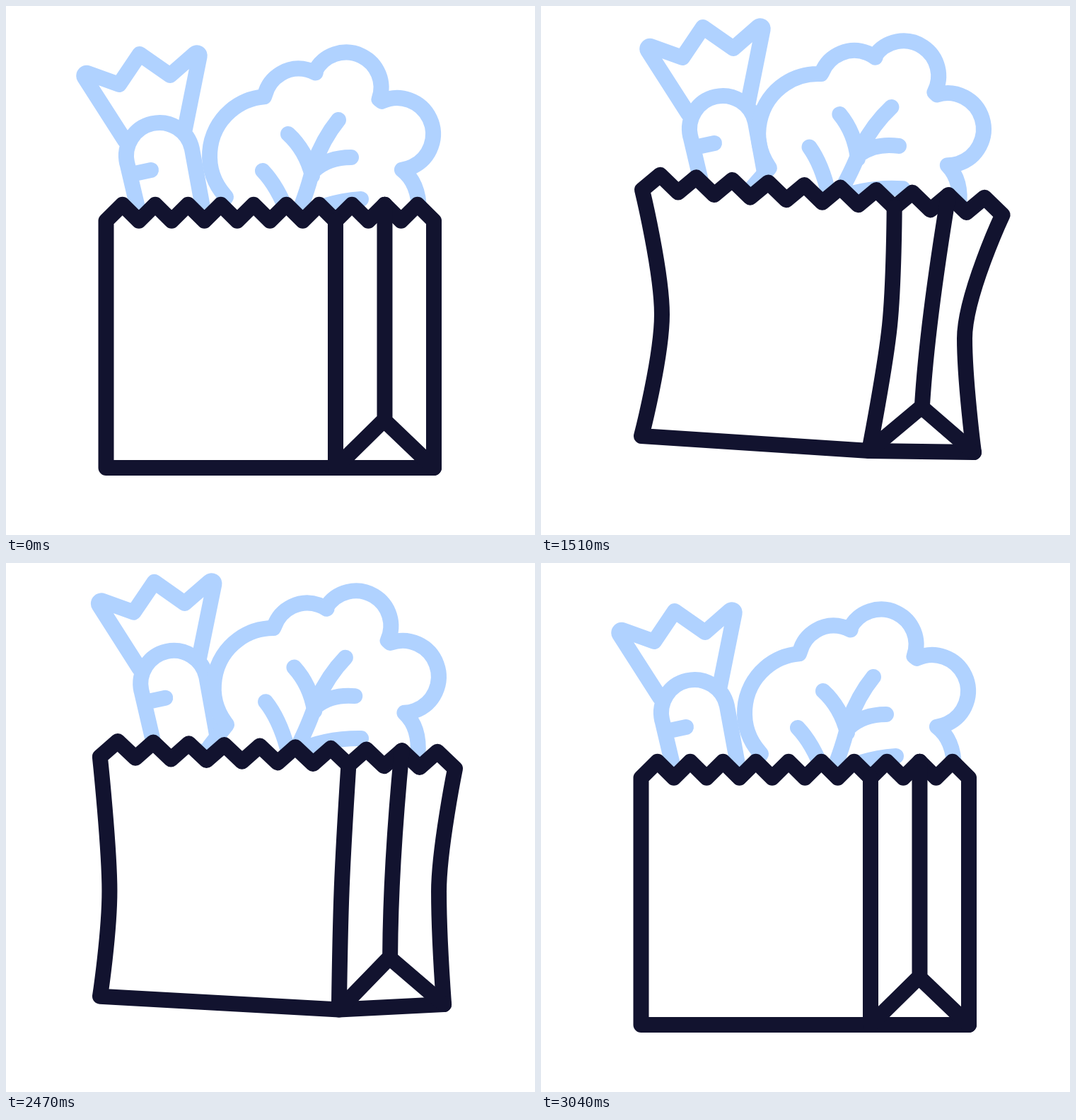
Write an HTML page with a canvas that moves like this. It is 748 by 748 pixels and loops after 3.07 s.

```html
<!DOCTYPE html>
<html lang="en">
<head>
<meta charset="utf-8">
<title>Grocery bag</title>
<style>
  html, body { margin: 0; width: 100%; height: 100%; overflow: hidden; background: #fff; }
  canvas { display: block; width: 100vw; height: 100vh; }
</style>
</head>
<body>
<canvas id="stage" width="748" height="748"></canvas>
<script>
const ctx = document.getElementById('stage').getContext('2d');
const DARK = '#12132f', LIGHT = '#b0d2ff';
const LOOP = 3070, STEP = 30, PHASE = 10;

// Bag points: top left/right, bottom left/middle/right,
// middles of left side, right side and fold, crease control, apex.
const BAG = {
  rest: [141.5, 303.8, 605, 303.8, 141.5, 653, 466, 653, 605, 653,
    141.5, 478, 605, 478, 466, 478, 535.5, 440, 534.5, 585.5],
  start: [137.5, 304, 609, 304, 142, 652.5, 466, 652, 606, 651,
    144, 485, 602, 468, 467.5, 470, 536, 440, 534.5, 585.5],
  rise: [134.5, 275, 645.5, 298.5, 142, 623.5, 463, 636, 612, 635.5,
    167, 455, 596, 476, 488, 455, 548, 450, 537.5, 572],
  lean: [143, 260, 652.5, 295.5, 142, 608, 464, 629, 612, 631,
    171, 436, 599, 470, 493, 452, 546, 450, 538, 567],
  high: [136, 248.5, 646, 276, 137, 593, 470, 621, 618, 611.5,
    174, 425, 594, 447, 495, 432, 543, 430, 541, 545],
  squash: [136, 313, 611, 313, 135, 653, 468, 653, 611.5, 653,
    120.5, 505, 624, 490, 453, 495, 540.5, 440, 538.5, 587]
};

// Carrot x, y, angle, then broccoli x, y, angle.
const FOOD = {
  rest: [0, 0, 0, 0, 0, 0],
  start: [0.5, -0.3, 0, -1, 0, 0],
  rise: [27.5, -25.6, -0.024, 13.5, -13, 0.12],
  lean: [40, -38, 0, 23, -21, 0.138],
  high: [30.5, -50, -0.018, 15, -38, 0.122],
  squash: [7.5, -26.5, 0.058, -1, -9, 0.036]
};

const mix = (a, b, k) => a.map((v, i) => v + (b[i] - v) * k);
const smooth = u => u * u * (3 - 2 * u);
const hop = u => smooth(u * u);

// A pose is a blend (or overshoot) from one named pose to another.
const pose = (a, b = a, bagK = 1, foodK = bagK) => ({
  bag: mix(BAG[a], BAG[b], bagK),
  food: mix(FOOD[a], FOOD[b], foodK)
});

const PEAK = 1 / hop((2260 - 1510) / (2380 - 1510));

// Each key: time, pose, easing used to arrive there.
const KEYS = [
  [700, pose('rest')],
  [730, pose('start'), u => u],
  [1030, pose('rise'), u => u * (1.32 - 0.32 * u)],
  [1510, pose('lean'), u => 1 - Math.pow(1 - u, 2.3)],
  [2380, pose('lean', 'high', PEAK), hop],
  [2530, pose('rest', 'squash', 2.15, 0.8), u => u * u],
  [2650, pose('squash'), u => u * (0.7 + 0.3 * u)],
  [2830, pose('rest', 'squash', -0.12, 0.28), u => u * (1.6 - 0.6 * u)],
  [3040, pose('rest'), smooth]
];

function poseAt(t) {
  if (t <= KEYS[0][0]) return KEYS[0][1];
  const i = KEYS.findIndex(k => k[0] >= t);
  if (i < 0) return KEYS[0][1];
  const [t0, a] = KEYS[i - 1], [t1, b, ease] = KEYS[i];
  const k = ease((t - t0) / (t1 - t0));
  return { bag: mix(a.bag, b.bag, k), food: mix(a.food, b.food, k) };
}

function place(px, py, x, y, angle, draw) {
  ctx.save();
  ctx.translate(px + x, py + y);
  ctx.rotate(angle);
  ctx.translate(-px, -py);
  ctx.beginPath();
  draw();
  ctx.stroke();
  ctx.restore();
}

function line(x0, y0, x1, y1) {
  ctx.moveTo(x0, y0);
  ctx.lineTo(x1, y1);
}

function vein(x0, y0, cx, cy, x1, y1) {
  ctx.moveTo(x0, y0);
  ctx.quadraticCurveTo(cx, cy, x1, y1);
}

function lobe(cx, cy, r, x0, y0, x1, y1) {
  ctx.arc(cx, cy, r, Math.atan2(y0 - cy, x0 - cx), Math.atan2(y1 - cy, x1 - cx));
}

function carrot() {
  // leaves
  ctx.moveTo(168, 190);
  ctx.arcTo(104.5, 91, 160, 111, 4);
  ctx.lineTo(160, 111);
  ctx.lineTo(189, 68);
  ctx.lineTo(232, 98);
  ctx.arcTo(276, 59.4, 253, 174, 4);
  ctx.lineTo(253, 174);
  // root
  ctx.moveTo(191, 306);
  ctx.lineTo(171.2, 222);
  ctx.arc(217, 212, 47, Math.PI - 0.22, -0.17);
  ctx.lineTo(282, 306);
  line(177, 238, 205, 232);
  line(254, 308, 282, 303);
}

function broccoli() {
  ctx.moveTo(290, 302);
  ctx.lineTo(311, 270);
  lobe(372, 212, 84, 309, 267, 365, 128);
  lobe(414, 138, 49.5, 367, 126, 438, 94);
  lobe(481, 115, 49.5, 438, 94, 528, 132);
  lobe(553, 181, 51, 531, 134, 560, 232);
  ctx.quadraticCurveTo(584, 250, 584, 290);
  ctx.lineTo(575, 312);
  // stem and veins
  ctx.moveTo(470, 161);
  ctx.quadraticCurveTo(448, 188, 435, 225);
  ctx.quadraticCurveTo(428, 258, 410, 302);
  vein(399, 181, 424, 204, 433, 240);
  vein(488, 214, 455, 214, 435, 233);
  vein(363, 233, 384, 255, 399, 295);
  vein(502, 273, 450, 277, 412, 300);
}

// Bent edge through m, with its tangent there along (dx, dy).
function bend(ax, ay, mx, my, bx, by, dx, dy) {
  ctx.bezierCurveTo(ax, ay, mx - dx, my - dy, mx, my);
  ctx.bezierCurveTo(mx + dx, my + dy, bx, by, bx, by);
}

function bag(p) {
  const [lx, ly, rx, ry, blx, bly, bmx, bmy, brx, bry,
    mlx, mly, mrx, mry, mfx, mfy, qx, qy, ax, ay] = p;
  const rim = k => [lx + (rx - lx) * k / 20,
    ly + (ry - ly) * k / 20 - (k % 2 ? 23 : 0)];

  ctx.beginPath();
  ctx.moveTo(lx, ly);
  for (let k = 1; k <= 20; k++) ctx.lineTo(...rim(k));
  bend(rx, ry, mrx, mry, brx, bry, 0, 60);
  ctx.lineTo(bmx, bmy);
  ctx.lineTo(blx, bly);
  bend(blx, bly, mlx, mly, lx, ly, 0, -60);
  ctx.closePath();
  ctx.fill();
  ctx.stroke();

  ctx.beginPath();
  const [fx, fy] = rim(14), [cx, cy] = rim(17);
  ctx.moveTo(fx, fy);
  bend(fx, fy, mfx, mfy, bmx, bmy, 60 * (bmx - fx) / (bmy - fy), 60);
  vein(cx, cy, qx, qy, ax + 1, ay - 3);
  ctx.moveTo(bmx, bmy);
  ctx.lineTo(ax, ay);
  ctx.lineTo(brx, bry);
  ctx.stroke();
}

function draw(t) {
  const { bag: b, food: f } = poseAt(t);
  ctx.fillStyle = '#fff';
  ctx.fillRect(0, 0, 748, 748);
  ctx.lineWidth = 22;
  ctx.lineCap = ctx.lineJoin = 'round';
  ctx.strokeStyle = LIGHT;
  place(217, 150, f[0], f[1], f[2], carrot);
  place(450, 180, f[3], f[4], f[5], broccoli);
  ctx.strokeStyle = DARK;
  bag(b);
}

const begin = performance.now();
function tick() {
  const t = (performance.now() - begin) % LOOP;
  draw(Math.floor((t - PHASE) / STEP) * STEP + PHASE);
  requestAnimationFrame(tick);
}
tick();
</script>
</body>
</html>
```
